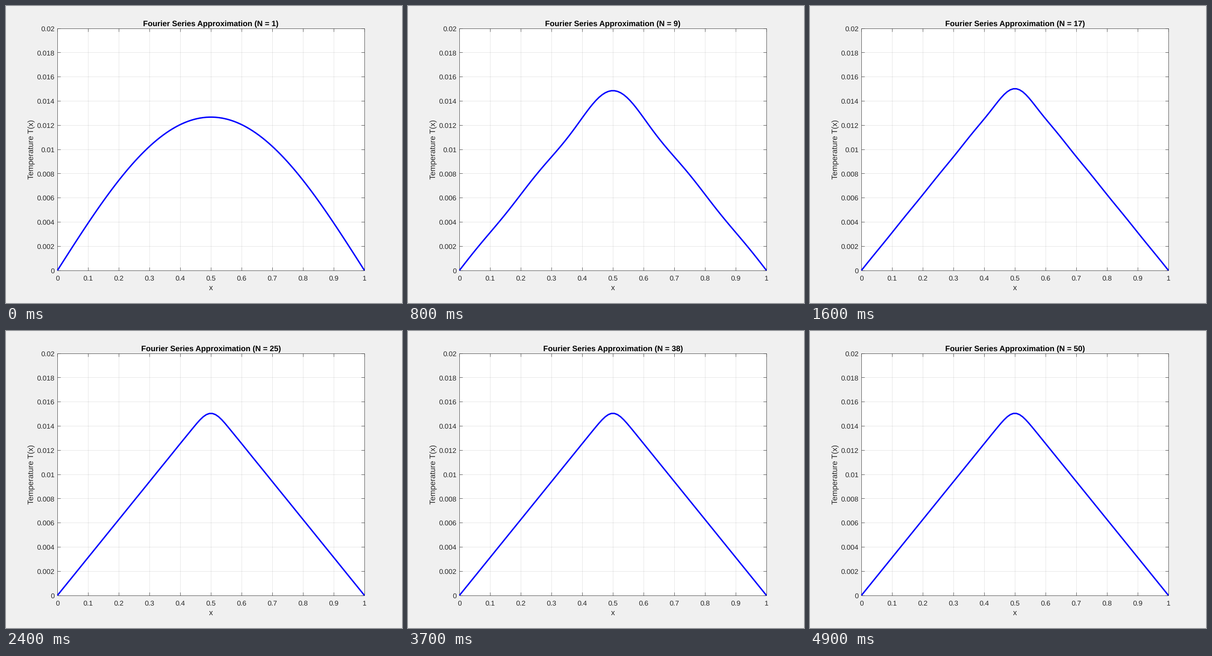
Animation of 864x648 px, one loop 5000 ms. Source, as a matplotlib script:

```python
import numpy as np
import matplotlib.pyplot as plt
from matplotlib.animation import FuncAnimation

WIDTH, HEIGHT = 864, 648
SCALE = WIDTH / 560          # pixels per layout unit
FRAMES, INTERVAL = 50, 100
INK = "#262626"
SIGMA = 0.025                # width of the heat source at mid-rod

plt.rcParams.update({
    "font.family": "Liberation Sans",
    "text.hinting": "none",
    "lines.solid_capstyle": "butt",
})

# 72 dpi makes one point equal one pixel
fig = plt.figure(figsize=(WIDTH / 72, HEIGHT / 72), dpi=72, facecolor="#f0f0f0")
ax = fig.add_axes([0.13, 0.11, 0.775, 0.815])
ax.set(xlim=(0, 1), ylim=(0, 0.02))
x_ticks = np.linspace(0, 1, 11)
y_ticks = np.linspace(0, 0.02, 11)
ax.set_xticks(x_ticks)
ax.set_yticks(y_ticks)
ax.set_axisbelow(True)
ax.grid(color=INK, alpha=0.15, linewidth=0.5 * SCALE)
ax.tick_params(direction="in", length=6.7, width=0.5 * SCALE, color=INK,
               top=True, right=True, labelbottom=False, labelleft=False)
for spine in ax.spines.values():
    spine.set(color=INK, linewidth=0.5 * SCALE, zorder=1)


def put(x, y, text, units=10, ha="center", **style):
    """Place text with its baseline at pixel (x, y), y measured downwards."""
    style.setdefault("color", INK)
    return fig.text(x / WIDTH, 1 - y / HEIGHT, text, fontsize=units * SCALE,
                    ha=ha, va="baseline", **style)


def to_pixels(x, y):
    px, py = ax.transData.transform((x, y))
    return px, HEIGHT - py


for tick in x_ticks:
    put(to_pixels(tick, 0)[0], 599, f"{tick:.2g}")
for tick in y_ticks:
    put(106, to_pixels(0, tick)[1] + 6, f"{tick:.2g}", ha="right")
put(447, 620, "x", 11)
put(59, 313, "Temperature T(x)", 11, rotation=90, rotation_mode="anchor")
title = put(447, 43, "", 11, color="black", weight="bold")

x = np.linspace(0, 1, 100)
curve, = ax.plot(x, 0 * x, color="blue", linewidth=2 * SCALE,
                 clip_on=False, zorder=3)


def temperature(terms):
    """Partial sine series of -T'' = exp(-(x - 0.5)^2 / (2 SIGMA^2))."""
    n = np.arange(1, terms + 1)
    k = n * np.pi
    strength = SIGMA * np.sqrt(2 * np.pi) * np.exp(-(k * SIGMA) ** 2 / 2)
    coefficients = 2 * strength * np.sin(k / 2) / k ** 2
    return np.sin(np.outer(x, k)) @ coefficients


def update(frame):
    terms = frame + 1
    curve.set_ydata(temperature(terms))
    title.set_text(f"Fourier Series Approximation (N = {terms})")
    return curve, title


animation = FuncAnimation(fig, update, frames=FRAMES, interval=INTERVAL,
                          repeat=True, repeat_delay=0)
plt.show()
```
